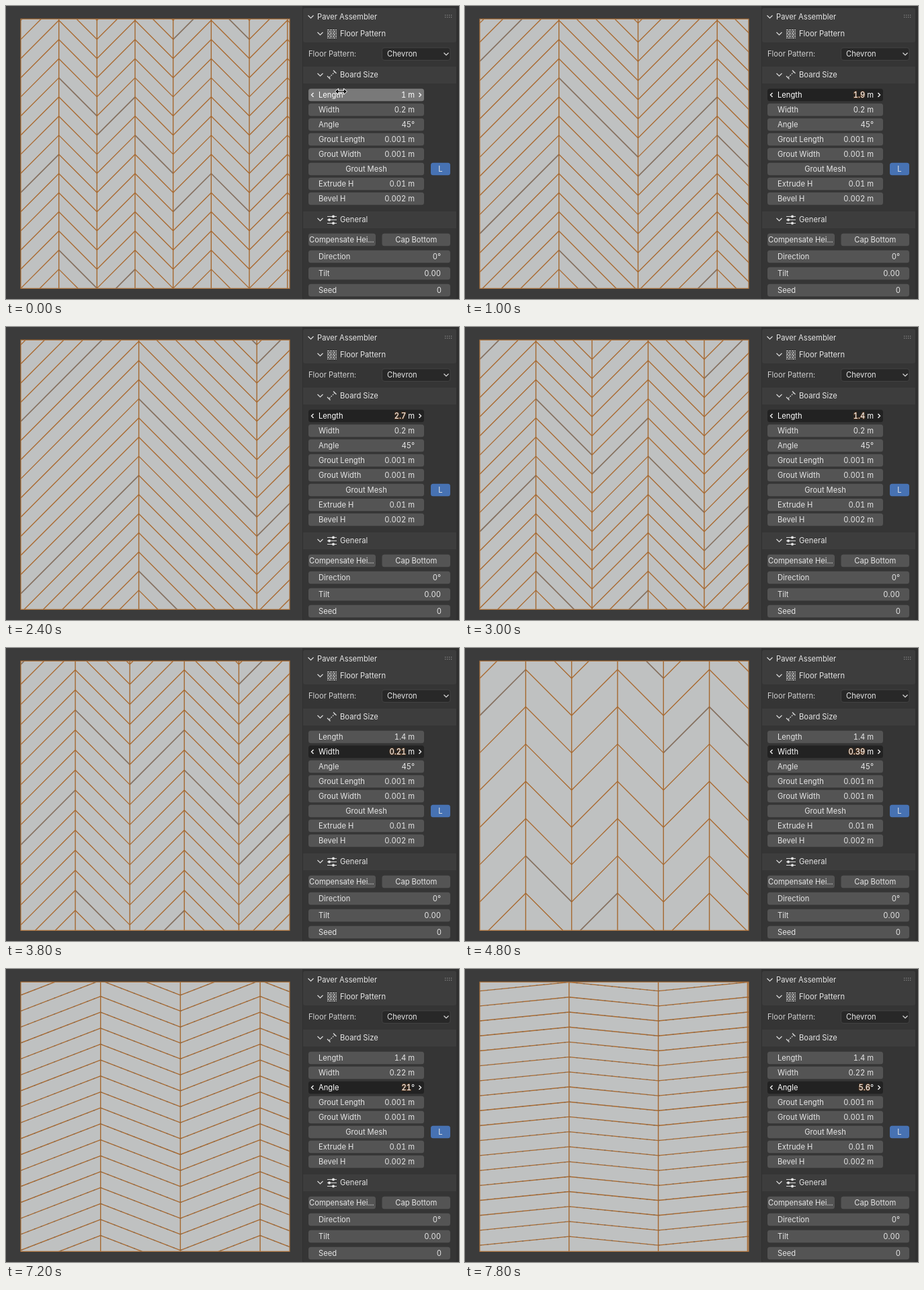
Recreate the animation shown at these times as an HTML page with a canvas. Size 674 by 435 pixels, loop 8000 ms.

```html
<!DOCTYPE html>
<html lang="en">
<head>
<meta charset="utf-8">
<title>Chevron floor settings</title>
<style>
  html, body { margin: 0; width: 100%; height: 100%; overflow: hidden; background: #3b3b3b; }
  canvas, svg { position: absolute; left: 0; top: 0; width: 674px; height: 435px; }
  text { font: 11.2px Inter, sans-serif; font-variant-numeric: tabular-nums; fill: #e6e6e6; white-space: pre; }
  .mid { text-anchor: middle; }
  .end { text-anchor: end; }
  .box { fill: #545454; }
  .line { fill: none; stroke: #dcdcdc; stroke-width: 1.2; }
  .arrows { visibility: hidden; stroke: #f4f4f4; stroke-width: 1.4; }
  .hover .box { fill: #797979; }
  .active .box { fill: #222; }
  .hover .arrows, .active .arrows { visibility: visible; }
  .hover text, .active text { fill: #fff; }
  .active .num { stroke: #8a552b; stroke-opacity: .6; stroke-width: 1.8px; paint-order: stroke; }
</style>
</head>
<body>
<canvas id="floor" width="674" height="435"></canvas>
<svg id="panel" viewBox="0 0 674 435"></svg>
<script>
const panel = document.getElementById('panel');
const ctx = document.getElementById('floor').getContext('2d');

function add(tag, attrs, parent = panel) {
  const el = document.createElementNS('http://www.w3.org/2000/svg', tag);
  for (const name in attrs) el.setAttribute(name, attrs[name]);
  parent.appendChild(el);
  return el;
}
const rect = (x, y, width, height, fill, rx = 0) => add('rect', { x, y, width, height, fill, rx });
const line = (d, cls = 'line', parent = panel) => add('path', { d, class: cls }, parent);

function label(x, y, str, cls = '', parent = panel) {
  const el = add('text', { x, y: y + 4, class: cls }, parent);
  el.textContent = str;
  return el;
}

function box(x, mid, width, parent = panel) {
  add('rect', { x, y: mid - 9.3, width, height: 18.6, rx: 3.5, class: 'box' }, parent);
}

function button(x, mid, width, str) {
  box(x, mid, width);
  label(x + width / 2, mid, str, 'mid');
}

function field(mid, name, value, unit = '', width = 172, right = 608) {
  const g = add('g', {});
  box(450, mid, width, g);
  label(465, mid, name, '', g);
  const text = label(right, mid, '', 'end', g);
  const num = add('tspan', { class: 'num' }, text);
  num.textContent = value;
  add('tspan', {}, text).textContent = unit;
  line(`M457.5 ${mid - 3}l-3 3 3 3M614.5 ${mid - 3}l3 3-3 3`, 'line arrows', g);
  return { g, num, mid };
}

function header(x, mid, str, textX) {
  line(`M${x - 4} ${mid - 2}l4 4 4-4`);
  label(textX, mid, str);
}

// Panel backgrounds
rect(441, 0, 233, 435, '#303030');
rect(442, 3, 228, 432, '#353535', 3);
rect(442, 3, 228, 51, '#3d3d3d', 3);
rect(442, 90, 228, 25, '#3d3d3d');
rect(442, 305, 228, 25, '#3d3d3d');

header(453.5, 16, 'Paver Assembler', 463);
header(467.5, 41, 'Floor Pattern', 497);
header(467.5, 102, 'Board Size', 497);
header(467.5, 317, 'General', 497);
for (let i = 0; i < 8; i++) rect(653 + (i % 4) * 3, 13 + (i >> 2) * 3, 1.2, 1.2, '#8c8c8c');

// Header icons
for (let i = 0; i < 6; i++) {
  line(`M478 ${35.5 + i * 2.4}h14`).setAttribute('stroke-dasharray', i % 2 ? '1.5 1 3 1' : '3 1');
}
line('M481 106l8-8').setAttribute('stroke-dasharray', '2 1.5');
line('M478 104l4.5 4.5M487 95.5l4.5 4.5');
line('M478 312.5h14M478 317.5h14M478 322.5h14');
[[487, 312.5], [481, 317.5], [487, 322.5]].forEach(([cx, cy]) => add('circle', { cx, cy, r: 2, fill: '#e6e6e6' }));

// Controls
label(450, 71, 'Floor Pattern:').style.fill = '#cfcfcf';
add('rect', { x: 559.5, y: 62, width: 101.5, height: 18.5, rx: 3.5, fill: '#282828', stroke: '#424242' });
label(567, 71, 'Chevron');
line('M651.5 69.5l3.5 3.5 3.5-3.5');

const rows = [
  field(132, 'Length', '1', ' m'),
  field(154, 'Width', '0.2', ' m'),
  field(176, 'Angle', '45', '°')
];
field(198, 'Grout Length', '0.001', ' m');
field(220, 'Grout Width', '0.001', ' m');
button(450, 242, 172, 'Grout Mesh');
rect(632, 232.7, 29, 18.6, '#4772b3', 3.5);
label(646.5, 242, 'L', 'mid');
field(264, 'Extrude H', '0.01', ' m');
field(286, 'Bevel H', '0.002', ' m');
button(450, 347, 100, '');
label(451, 347, 'Compensate Hei...');
button(559.5, 347, 101.5, 'Cap Bottom');
field(372, 'Direction', '0', '°', 211, 647);
field(397, 'Tilt', '0.00', '', 211, 647);
field(422, 'Seed', '0', '', 211, 648);

const cursor = add('path', {
  d: 'M-9 0l5-4.5v3.3h8v-3.3l5 4.5-5 4.5v-3.3h-8v3.3z',
  fill: '#111', stroke: '#fff', 'stroke-width': 1
});

// Cosine easing through [time, value] keys
function ease(t, keys) {
  if (t <= keys[0][0]) return keys[0][1];
  for (let i = 1; i < keys.length; i++) {
    const [t0, a] = keys[i - 1], [t1, b] = keys[i];
    if (t < t1) return a + (b - a) * (1 - Math.cos(Math.PI * (t - t0) / (t1 - t0))) / 2;
  }
  return keys[keys.length - 1][1];
}

function angleAt(t) {
  if (t < 6000) return 45;
  const s = (t - 6000) / 1000;
  return 44 - 14.83 * s - 3.61 * s * s;
}

// [start, row, state]
const phases = [
  [0, 0, 'hover'], [600, 0, 'active'], [3400, 0, 'hover'], [3600, 1, 'hover'],
  [3800, 1, 'active'], [5600, 1, 'hover'], [5800, 2, 'hover'], [6000, 2, 'active']
];

const floor = { x: 22, y: 19.3, size: 400, scale: 100, grout: 0.001 };
const worn = [7, 2, 1, 8, 6, 6];

function stroke(color, width, x0, y0, x1, y1) {
  ctx.strokeStyle = color;
  ctx.lineWidth = width;
  ctx.beginPath();
  ctx.moveTo(x0, y0);
  ctx.lineTo(x1, y1);
  ctx.stroke();
}

function drawFloor(length, width, angle) {
  const { x, y, size, scale, grout } = floor;
  const a = angle * Math.PI / 180;
  const col = (length * Math.cos(a) - width * Math.sin(a) + grout) * scale;
  const gap = (width + grout) / Math.cos(a) * scale;
  const rise = col * Math.tan(a);
  const skewed = angle !== 45;

  ctx.fillStyle = '#3b3b3b';
  ctx.fillRect(0, 0, 674, 435);
  ctx.save();
  ctx.beginPath();
  ctx.rect(x, y, size, size);
  ctx.clip();
  ctx.fillStyle = '#bfc1c1';
  ctx.fillRect(x, y, size, size);

  for (let c = 0; c * col < size; c++) {
    const left = x + c * col;
    for (let k = 1; k * gap < size + rise; k++) {
      const peak = y + size - k * gap;
      const ends = c % 2 ? [left, peak, left + col, peak + rise] : [left, peak + rise, left + col, peak];
      const grey = !skewed && k % 9 === worn[c];
      stroke(grey ? '#85705f' : '#a9692f', grey ? 1.7 : 1.35, ...ends);
      if (skewed) {
        ctx.setLineDash([2.5, 8]);
        stroke('rgba(112,104,98,.7)', 1.3, ...ends);
        ctx.setLineDash([]);
      }
    }
    if (c) stroke('#a5682f', 1.4, left, y, left, y + size);
  }
  ctx.restore();
  ctx.strokeStyle = '#b0733b';
  ctx.lineWidth = 1.2;
  ctx.strokeRect(x, y, size, size);
}

let shown = -1;
function tick() {
  const now = performance.now() % 8000;
  const t = now < 600 ? 0 : Math.floor(now / 200) * 200;
  if (t !== shown) {
    shown = t;
    const values = [
      ease(t, [[400, 1], [1900, 3.5], [3080, 1.355]]),
      ease(t, [[3700, 0.2], [4500, 0.447], [5400, 0.22]]),
      angleAt(t)
    ];
    const [, row, state] = phases.filter(p => p[0] <= t).pop();
    rows.forEach((r, i) => {
      r.num.textContent = +values[i].toPrecision(2);
      r.g.setAttribute('class', i === row ? state : '');
    });
    cursor.setAttribute('transform', `translate(498.5 ${rows[row].mid - 5})`);
    cursor.style.visibility = state === 'hover' ? 'visible' : 'hidden';
    drawFloor(...values);
  }
  requestAnimationFrame(tick);
}
tick();
</script>
</body>
</html>
```
